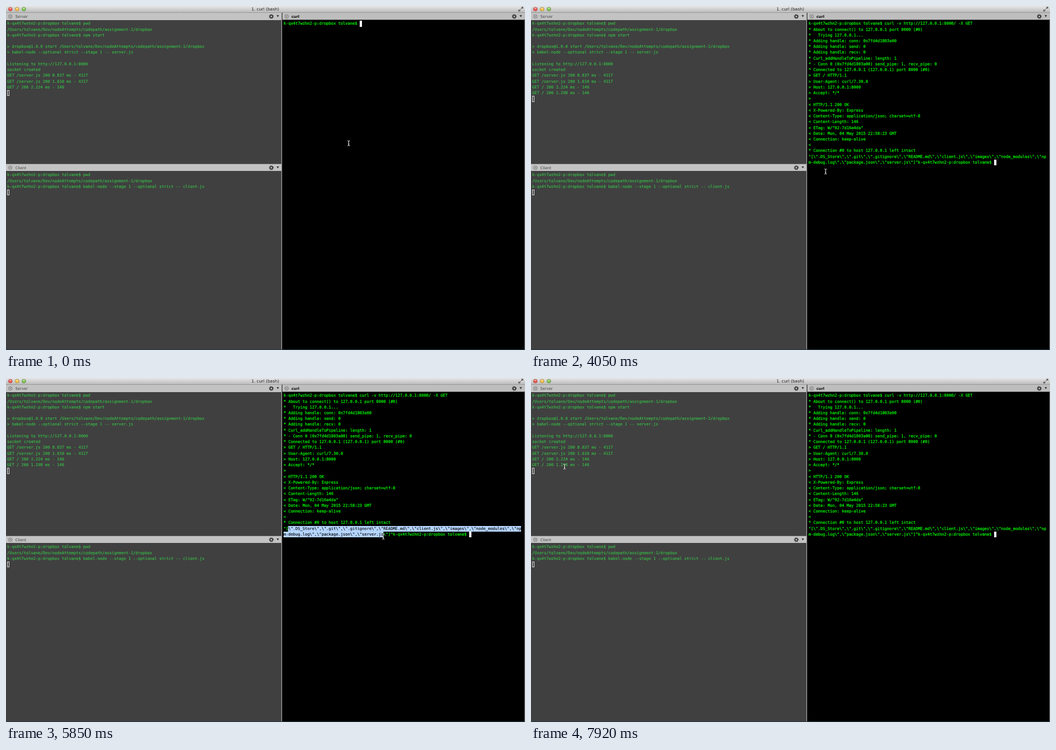
Write an HTML page that moves like this. It is 920x609 px and loops after 8000 ms.

```html
<!DOCTYPE html>
<html lang="en">
<head>
<meta charset="utf-8">
<title>Terminal panes</title>
<style>
html, body { margin: 0; width: 100%; height: 100%; overflow: hidden; background: #000; }
#stage {
  position: relative; width: 920px; height: 609px; overflow: hidden; background: #000;
  text-rendering: geometricPrecision;
}
#stage > * { position: absolute; }
.pane { background: #404040; left: 0; width: 488px; }
pre {
  margin: 0; color: #00f400; white-space: pre;
  font: 7.003px/10.23px "DejaVu Sans Mono", monospace;
  -webkit-text-stroke: .25px;
}
.dim { left: 2px; color: #37bd47; -webkit-text-stroke-width: .15px; }
#shell { left: 492px; top: 26.3px; }
.block, .box { display: inline-block; vertical-align: top; width: 1ch; height: 10.23px; }
.block { background: #fff; }
.box { box-sizing: border-box; border: 1px solid #d8d8d8; }
.sel { overflow: hidden; height: 10.23px; background: #b5d5ff; color: #000; -webkit-text-stroke-width: .1px; }
svg { left: 0; top: 0; }
svg text { font-family: "DejaVu Sans", sans-serif; }
</style>
</head>
<body>
<div id="stage">
  <div class="pane" style="top:25px;height:254px"></div>
  <div class="pane" style="top:292px;height:316px"></div>

<pre class="dim" style="top:26.3px">k-qx4t7wzhn2-p:dropbox tolvane$ pwd
/Users/tolvane/Dev/nodeAttempts/codepath/assignment-1/dropbox
k-qx4t7wzhn2-p:dropbox tolvane$ npm start

&gt; dropbox@1.0.0 start /Users/tolvane/Dev/nodeAttempts/codepath/assignment-1/dropbox
&gt; babel-node --optional strict --stage 1 -- server.js

Listening to http://127.0.0.1:8000
socket created
GET /server.js 200 8.837 ms - 4117
GET /server.js 200 1.610 ms - 4117
GET / 200 2.224 ms - 146
<span class="reply">GET / 200 1.298 ms - 146
</span><i class="box"></i></pre>

<pre class="dim" style="top:294.4px">k-qx4t7wzhn2-p:dropbox tolvane$ pwd
/Users/tolvane/Dev/nodeAttempts/codepath/assignment-1/dropbox
k-qx4t7wzhn2-p:dropbox tolvane$ babel-node --stage 1 --optional strict -- client.js
<i class="box"></i></pre>

<pre id="shell">k-qx4t7wzhn2-p:dropbox tolvane$ <span id="command">curl -v http://127.0.0.1:8000/ -X GET</span><i class="block" id="caret"></i><span class="reply">
* About to connect() to 127.0.0.1 port 8000 (#0)
*   Trying 127.0.0.1...
* Adding handle: conn: 0x7fd4d1803a00
* Adding handle: send: 0
* Adding handle: recv: 0
* Curl_addHandleToPipeline: length: 1
* - Conn 0 (0x7fd4d1803a00) send_pipe: 1, recv_pipe: 0
* Connected to 127.0.0.1 (127.0.0.1) port 8000 (#0)
&gt; GET / HTTP/1.1
&gt; User-Agent: curl/7.30.0
&gt; Host: 127.0.0.1:8000
&gt; Accept: */*
&gt;
&lt; HTTP/1.1 200 OK
&lt; X-Powered-By: Express
&lt; Content-Type: application/json; charset=utf-8
&lt; Content-Length: 146
&lt; ETag: W/"92-7d16a4da"
&lt; Date: Mon, 04 May 2015 22:58:23 GMT
&lt; Connection: keep-alive
&lt;
* Connection #0 to host 127.0.0.1 left intact
"[\".DS_Store\",\".git\",\".gitignore\",\"README.md\",\"client.js\",\"images\",\"node_modules\",\"np
m-debug.log\",\"package.json\",\"server.js\"]"k-qx4t7wzhn2-p:dropbox tolvane$ <i class="block"></i></span></pre>

<pre class="sel" id="selTop" style="left:500.43px;top:261.6px">\".DS_Store\",\".git\",\".gitignore\",\"README.md\",\"client.js\",\"images\",\"node_modules\",\"np</pre>
<pre class="sel" id="selEnd" style="left:492px;top:271.83px">m-debug.log\",\"package.json\",\"server.js\"]"</pre>

  <svg width="920" height="609">
    <defs>
      <linearGradient id="bar" x2="0" y2="1">
        <stop stop-color="#e6e6e6"/><stop offset="1" stop-color="#b9b9b9"/>
      </linearGradient>
      <g id="light">
        <circle r="3.5" stroke="#000" stroke-opacity=".3" stroke-width=".8"/>
        <ellipse cy="-1.5" rx="1.8" ry="1.1" fill="#fff" opacity=".6"/>
      </g>
      <g id="tools" fill="none" stroke="#333">
        <circle r="2.3" stroke-width="1.6"/>
        <circle r="3.5" stroke-width="1.3" stroke-dasharray="1.37 1.38"/>
        <path d="M9.3-2.3h4.4l-2.2 3.6z" fill="#333" stroke="none"/>
      </g>
      <g id="close" fill="none" stroke="#666" stroke-width=".8">
        <circle r="3.2"/><path d="M-1.3-1.3l2.6 2.6m0-2.6l-2.6 2.6"/>
      </g>
      <path id="beam" d="M-2-4.5Q0-4.5 0-3V3Q0 4.5-2 4.5M2-4.5Q0-4.5 0-3M0 3Q0 4.5 2 4.5M-1 1.5H1"/>
    </defs>
    <rect width="920" height="12" fill="url(#bar)"/>
    <path d="M0 11.5H920" stroke="#989898"/>
    <use href="#light" x="7.7" y="5.5" fill="#ee5b52"/>
    <use href="#light" x="19.7" y="5.5" fill="#f5c14a"/>
    <use href="#light" x="31.7" y="5.5" fill="#83c653"/>
    <text x="459.5" y="8.3" font-size="7.4" text-anchor="middle" fill="#222">1. curl (bash)</text>
    <path d="M913 5l3-3m-2.6 0h2.9v2.6M912 6l-3 3m2.6 0h-2.9v-2.6" fill="none" stroke="#555" stroke-width="1.1"/>

    <rect y="12" width="488" height="13" fill="#c3c3c3"/>
    <rect y="279.5" width="488" height="12.5" fill="#c3c3c3"/>
    <rect x="490" y="12" width="430" height="12.4" fill="#bebebe"/>
    <path d="M488.5 12V608" stroke="#a6a6a6"/>
    <path d="M489.5 12V608" stroke="#333"/>
    <path d="M919.5 25V608" stroke="#777"/>
    <path d="M0 608.5H920" stroke="#23384a"/>
    <use href="#close" x="7.7" y="18.5"/>
    <use href="#close" x="7.7" y="286.3"/>
    <use href="#close" x="497.5" y="18.5"/>
    <use href="#tools" x="470.3" y="18.5"/>
    <use href="#tools" x="470.3" y="286.3"/>
    <use href="#tools" x="901" y="18.5"/>
    <g font-size="6.7" fill="#444">
      <text x="16.6" y="21">Server</text>
      <text x="16.6" y="288.8">Client</text>
      <text x="506" y="21" font-weight="bold" font-size="6.5" fill="#000">curl</text>
    </g>
    <g id="mouse" fill="none">
      <use href="#beam" stroke="#000" stroke-opacity=".55" stroke-width="2"/>
      <use href="#beam" stroke="#f4f4f4"/>
    </g>
  </svg>
</div>
<script>
const LOOP = 8000, COMMAND = 750, REPLY = 2850, DESELECT = 7190;
const CELL = 4.216, LEFT = 492, LAST_ROW = 272;
const HOME = [607.5, 243], REST = [685, 283], CLICK = [657, 297];

const el = id => document.getElementById(id);
const replies = document.querySelectorAll('.reply');
const linear = p => p;
const easeOut = p => 1 - (1 - p) ** 2;

// Pointer gestures: each runs in a few held steps along a quadratic curve.
const gesture = (start, steps, from, via, to, ease = easeOut, hold = 150) =>
  ({ start, steps, from, via, to, ease, hold });

const drag = gesture(5250, 7, [486, 270], [585.5, 270], REST);
const gestures = [
  gesture(0, 1, HOME, HOME, HOME),
  gesture(300, 2, HOME, [615.5, 249], HOME, linear, 300),
  gesture(3450, 9, HOME, [560, 346], [498.5, 270]),
  drag,
  gesture(6740, 3, REST, [671, 293], CLICK),
  gesture(DESELECT, 6, CLICK, [284, 283], [59.5, 157], linear, 146)
];

const progress = (g, t) => Math.min(1, (Math.floor((t - g.start) / g.hold) + 1) / g.steps);

function point(g, p) {
  const u = g.ease(p), v = 1 - u;
  return g.from.map((a, i) => v * v * a + 2 * u * v * g.via[i] + u * u * g.to[i]);
}

// Columns selected in both rows; the selection trails the pointer slightly.
function selected(t) {
  if (t < drag.start || t >= DESELECT) return [0, 0];
  const p = progress(drag, t);
  const column = Math.ceil((point(drag, p - .03)[0] - LEFT) / CELL);
  return point(drag, p)[1] < LAST_ROW ? [column - 2, 0] : [98, column];
}

const show = (node, on) => { node.style.display = on ? '' : 'none'; };

function draw(t) {
  const g = gestures.findLast(g => g.start <= t);
  const [x, y] = point(g, progress(g, t));
  const [top, end] = selected(t);
  show(el('command'), t >= COMMAND);
  show(el('caret'), t < REPLY);
  replies.forEach(node => show(node, t >= REPLY));
  el('selTop').style.width = top + 'ch';
  el('selEnd').style.width = end + 'ch';
  el('mouse').setAttribute('transform', `translate(${x} ${y})`);
}

const start = performance.now();
function tick() {
  draw((performance.now() - start) % LOOP);
  requestAnimationFrame(tick);
}
tick();
</script>
</body>
</html>
```
